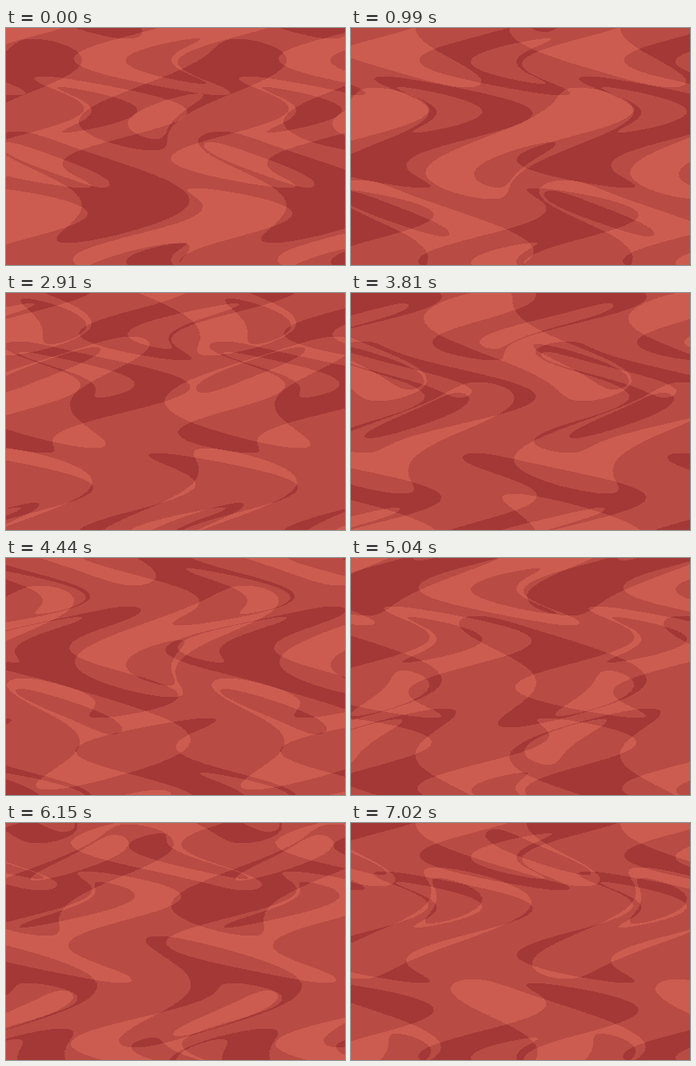
These frames come from a looping animation (424 by 297 pixels, 7.05 s). An HTML page with a canvas:

```html
<!DOCTYPE html>
<html lang="en">
<head>
<meta charset="utf-8">
<title>Wavy red background</title>
<style>
html, body { margin: 0; width: 100%; height: 100%; overflow: hidden; background: #b84b44; }
canvas { display: block; width: 424px; height: 297px; }
</style>
</head>
<body>
<canvas id="stage" width="424" height="297"></canvas>
<script>
const W = 424, H = 297, SIZE = 256, LOOP = 7050, STEP = 30;
const ctx = document.getElementById('stage').getContext('2d');
const image = ctx.createImageData(W, H);
const pixels = new Uint32Array(image.data.buffer);
const rgb = (r, g, b) => (255 << 24 | b << 16 | g << 8 | r) >>> 0;
const colours = [rgb(164, 56, 54), rgb(184, 75, 68), rgb(204, 92, 80)];

// Circles of the repeating tile: centre and radius. Overlaps cancel out.
const circles = [
  [225, 14, 70],
  [86, 130, 70],
  [253, 41, 28.5],
  [60, 102, 28.5]
];

// Shortest distance on the wrapping tile
const gap = (a, b) => {
  const d = Math.abs(a - b) % SIZE;
  return Math.min(d, SIZE - d);
};

const tile = new Uint8Array(SIZE * SIZE);
for (let y = 0; y < SIZE; y++) {
  for (let x = 0; x < SIZE; x++) {
    for (const [cx, cy, r] of circles) {
      if (Math.hypot(gap(x, cx), gap(y, cy)) < r) tile[y * SIZE + x] ^= 1;
    }
  }
}

function draw(ms) {
  const tick = ms / 16;
  const scroll = 69 + Math.floor(tick);
  const sign = Math.floor(ms / 750) % 2 ? -1 : 1;
  for (let y = 0, i = 0; y < H; y++) {
    const shiftA = Math.round(-75 * Math.cos((y - 40) / 20 + tick / 10));
    const shiftB = Math.round(75 * Math.cos((y - 29.5) / 30 + tick / 15));
    const rowA = (y & 255) * SIZE;
    const rowB = ((y - scroll) & 255) * SIZE;
    for (let x = 0; x < W; x++) {
      const a = tile[rowA + ((x - shiftA) & 255)];
      const b = tile[rowB + ((x - shiftB) & 255)];
      pixels[i++] = colours[1 + sign * (a - b)];
    }
  }
  ctx.putImageData(image, 0, 0);
}

const start = performance.now();
function play() {
  const ms = (performance.now() - start) % LOOP;
  draw(Math.floor(ms / STEP) * STEP);
  requestAnimationFrame(play);
}
play();
</script>
</body>
</html>
```
